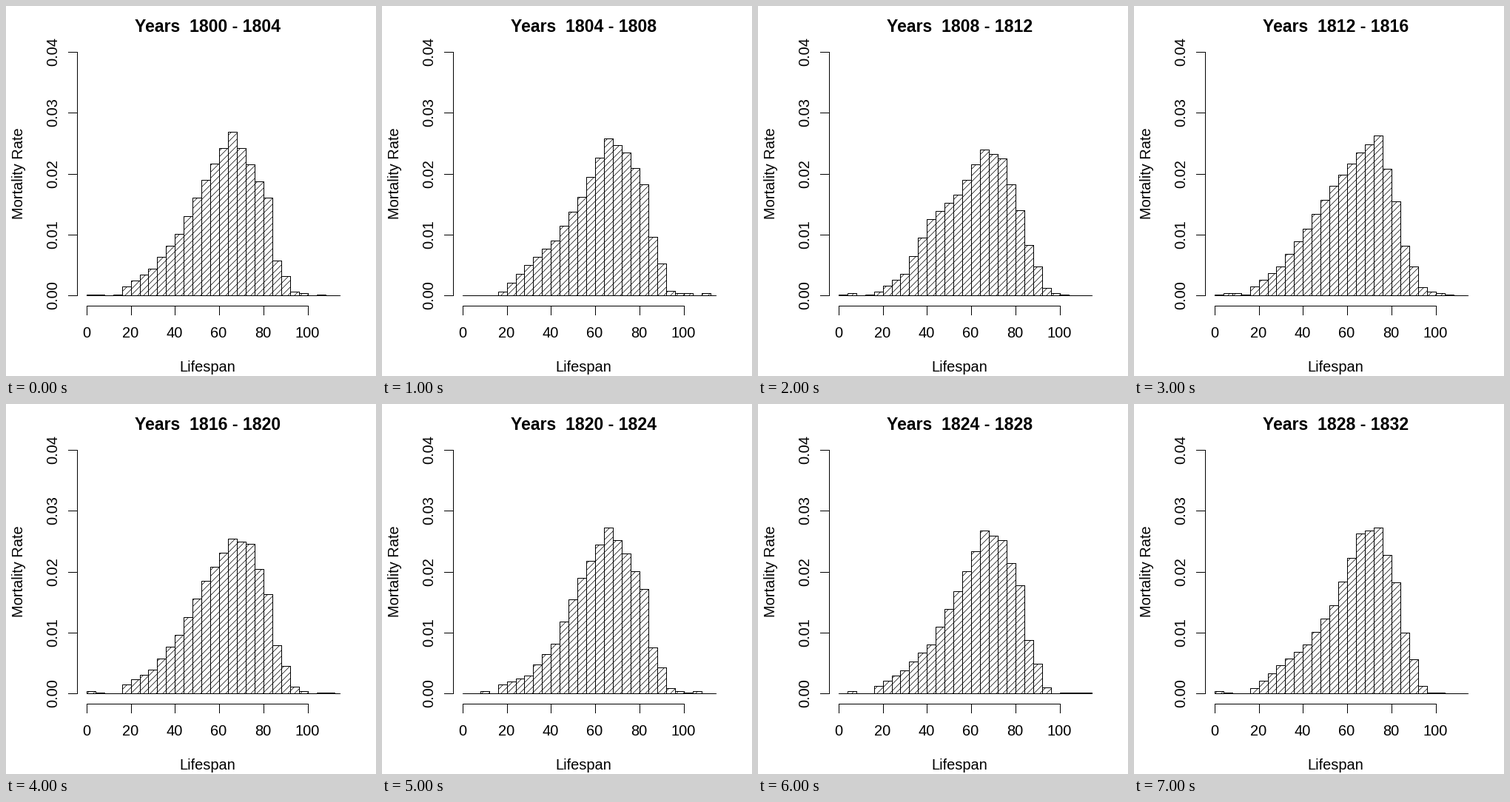
A matplotlib script for the animation above (8 s loop, 500 by 500 pixels).

```python
import math

import matplotlib.pyplot as plt
import numpy as np
from matplotlib.animation import FuncAnimation
from matplotlib.collections import LineCollection

SIZE, DPI = 500, 100
PX = 72 / DPI                   # one pixel in points
X0, X_SCALE = 109.1, 2.996      # pixel of age 0, pixels per year of age
Y0, Y_SCALE = 391.8, 0.824      # pixel of rate 0, pixels per 0.0001
RIGHT = 451.5
HATCH_STEP = 6 * math.sqrt(2)   # vertical gap between hatch lines
START, SPAN, PERIODS = 1800, 4, 8
AGES = np.arange(0, 116, 4)

# Outline of the distribution: rates in units of 0.0001 at a few key ages
KEY_AGES = [16, 28, 40, 52, 64, 72, 80, 84, 92]
KEY_RATES = {
    1800: [15, 44, 101, 190, 268, 215, 160, 58, 7],
    1804: [7, 50, 90, 162, 258, 235, 183, 96, 8],
    1808: [7, 35, 125, 165, 240, 225, 140, 83, 12],
    1812: [15, 48, 110, 180, 235, 262, 154, 82, 14],
    1820: [15, 30, 82, 190, 272, 230, 172, 76, 9],
    1828: [9, 46, 80, 145, 262, 272, 183, 100, 12],
}


def col(age):
    return math.floor(X0 + X_SCALE * age) + 0.5


def row(rate):
    return math.floor(Y0 - Y_SCALE * rate) + 0.5


def rates(year):
    """Outline blended over time, with sparse random deaths in both tails."""
    years = list(KEY_RATES)
    keys = [np.interp(year, years, r) for r in zip(*KEY_RATES.values())]
    body = np.interp(AGES, KEY_AGES, keys)
    mean = np.interp(AGES, [0, 12, 96, 112], [1, 0.3, 1.6, 0.2])
    tail = 2 * np.random.default_rng(year).poisson(mean)
    inside = (AGES >= KEY_AGES[0]) & (AGES <= KEY_AGES[-1])
    return np.where(inside, body, tail)


def hatch(left, right, top, bottom):
    """Rising diagonals on one grid shared by all bars."""
    origin = X0 + Y0
    first = math.ceil((left + top - origin) / HATCH_STEP)
    last = math.floor((right + bottom - origin) / HATCH_STEP)
    lines = []
    for k in range(first, last + 1):
        total = round(origin + k * HATCH_STEP)
        a, b = max(left, total - bottom), min(right, total - top)
        if a < b:
            lines.append([(a, total - a), (b, total - b)])
    return lines


def histogram(year):
    bottom = row(0)
    edges, diagonals = [[(col(0), bottom), (RIGHT, bottom)]], []
    for age, rate in zip(AGES, rates(year)):
        if rate == 0:
            continue
        left, right, top = col(age), col(age + 4), row(rate)
        end = min(right, RIGHT)
        edges.append([(left, bottom), (left, top), (end, top)])
        if right <= RIGHT:
            edges.append([(right, top), (right, bottom)])
        diagonals += hatch(left, end, top, bottom)
    return edges, diagonals


def strokes(lines, cap="projecting", width=1):
    group = LineCollection(lines, colors="black", linewidths=width * PX,
                           capstyle=cap, joinstyle="miter", snap=False)
    return ax.add_collection(group, autolim=False)


def label(x, y, text, size=20, **style):
    return ax.text(x, y, text, fontsize=size * PX, ha="center",
                   va="baseline", rotation_mode="anchor", **style)


plt.rcParams["font.family"] = "Liberation Sans"
fig = plt.figure(figsize=(SIZE / DPI, SIZE / DPI), dpi=DPI, facecolor="white")
ax = fig.add_axes([0, 0, 1, 1])
ax.set_xlim(0, SIZE)
ax.set_ylim(SIZE, 0)
ax.axis("off")

# Axes
axis_x, axis_y, tick = 96.5, 405.5, 12
axes_lines = [[(col(0), axis_y), (col(100), axis_y)],
              [(axis_x, row(0)), (axis_x, row(400))]]
for age in range(0, 101, 20):
    axes_lines.append([(col(age), axis_y), (col(age), axis_y + tick)])
    label(col(age) - 1, 448, str(age))
for level in range(0, 401, 100):
    axes_lines.append([(axis_x - tick, row(level)), (axis_x, row(level))])
    label(69, row(level) - 1, f"{level / 10000:.2f}", rotation=90)
strokes(axes_lines)

label(272.5, 493.5, "Lifespan")
label(23.5, 226, "Mortality Rate", rotation=90)
title = label(273, 35, "", size=23, weight="bold")
hatching = strokes([], cap="butt", width=0.7)
outlines = strokes([])


def update(i):
    year = START + SPAN * i
    edges, diagonals = histogram(year)
    outlines.set_segments(edges)
    hatching.set_segments(diagonals)
    title.set_text(f"Years  {year} - {year + SPAN}")
    return title, hatching, outlines


anim = FuncAnimation(fig, update, frames=PERIODS, interval=1000,
                     repeat=True, repeat_delay=0)
plt.show()
```
